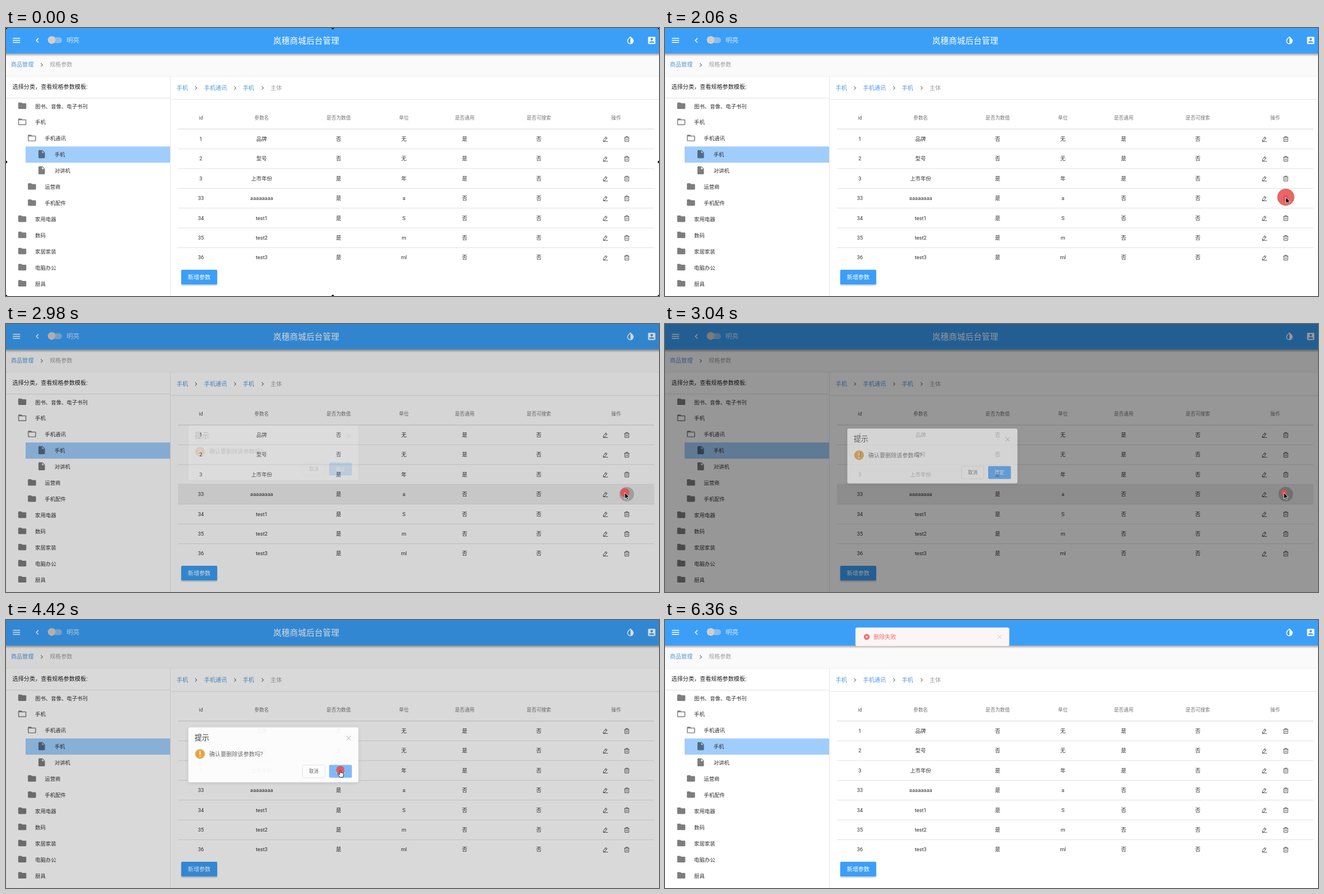
These frames come from a looping animation (1166x480 px, 7.98 s). An HTML page:

```html
<!DOCTYPE html>
<html lang="zh-CN">
<head>
<meta charset="utf-8">
<title>后台管理</title>
<style>
html, body { margin: 0; width: 100%; height: 100%; overflow: hidden; background: #fff; }
svg { display: block; width: 1166px; height: 480px; font-family: Roboto, "Noto Sans CJK SC", "Noto Sans CJK", sans-serif; }
</style>
</head>
<body>
<svg id="stage" viewBox="0 0 1166 480" xmlns="http://www.w3.org/2000/svg"></svg>
<script>
const LOOP = 7980;
const BLUE = '#3b9ff8', LINK = '#5497d9', INK = '#303030', MUTED = '#9e9e9e';

const ICONS = {
  menu: 'M3 18h18v-2H3v2zm0-5h18v-2H3v2zm0-7v2h18V6H3z',
  left: 'M15.41 7.41L14 6l-6 6 6 6 1.41-1.41L10.83 12z',
  right: 'M10 6L8.59 7.41 13.17 12l-4.58 4.59L10 18l6-6z',
  folder: 'M10 4H4c-1.1 0-2 .9-2 2v12c0 1.1.9 2 2 2h16c1.1 0 2-.9 2-2V8c0-1.1-.9-2-2-2h-8l-2-2z',
  open: 'M20 6h-8l-2-2H4c-1.1 0-2 .9-2 2v12c0 1.1.9 2 2 2h16c1.1 0 2-.9 2-2V8c0-1.1-.9-2-2-2zm0 12H4V8h16v10z',
  file: 'M6 2c-1.1 0-2 .9-2 2v16c0 1.1.9 2 2 2h12c1.1 0 2-.9 2-2V8l-6-6H6zm7 7V3.5L18.5 9H13z',
  invert: 'M17.66 7.93L12 2.27 6.34 7.93c-3.12 3.12-3.12 8.19 0 11.31C7.9 20.8 9.95 21.58 12 21.58s4.1-.78 5.66-2.34c3.12-3.12 3.12-8.19 0-11.31zM12 19.59c-1.6 0-3.11-.62-4.24-1.76C6.62 16.69 6 15.19 6 13.59s.62-3.11 1.76-4.24L12 5.1v14.49z',
  account: 'M3 5v14c0 1.1.89 2 2 2h14c1.1 0 2-.9 2-2V5c0-1.1-.9-2-2-2H5c-1.11 0-2 .9-2 2zm12 4c0 1.66-1.34 3-3 3s-3-1.34-3-3 1.34-3 3-3 3 1.34 3 3zm-9 8c0-2 4-3.1 6-3.1s6 1.1 6 3.1v1H6v-1z'
};

// Markup helpers; y is always the vertical centre.
const text = (s, x, y, size, fill = INK, anchor = 'start', extra = '') =>
  `<text x="${x}" y="${y + size * 0.365}" font-size="${size}" fill="${fill}" text-anchor="${anchor}" ${extra}>${s}</text>`;
const rect = (x, y, w, h, fill, extra = '') =>
  `<rect x="${x}" y="${y}" width="${w}" height="${h}" fill="${fill}" ${extra}/>`;
const icon = (name, x, y, fill, scale = 0.723) =>
  `<path d="${ICONS[name]}" fill="${fill}" transform="translate(${x} ${y}) scale(${scale}) translate(-12 -12)"/>`;
const cross = (x, y, r, color, width = 0.9) =>
  `<path d="M${x - r} ${y - r}l${2 * r} ${2 * r}m0 ${-2 * r}l${-2 * r} ${2 * r}" stroke="${color}" stroke-width="${width}" fill="none"/>`;
const rowY = i => 198.5 + 35.42 * i;

function header() {
  return rect(0, 45, 1166, 6, 'url(#shade)') + rect(0, 0, 1166, 45.5, BLUE) +
    icon('menu', 18.7, 22.2, '#fff') + icon('left', 56, 22.2, '#fff') +
    rect(76, 16.5, 24, 10.4, '#8bbdec', 'rx="5.2"') +
    '<circle cx="81.7" cy="22.2" r="7.3" fill="#000" opacity=".18"/><circle cx="81.6" cy="21.6" r="7.1" fill="#cfcfcf"/>' +
    text('明亮', 108, 21.5, 11.57, '#cfe6fc') +
    text('岚穗商城后台管理', 536.2, 22.5, 14.46, '#fff', 'middle', 'font-weight="500" letter-spacing=".29"') +
    icon('invert', 1115, 22, '#fff') + icon('account', 1153, 22.2, '#fff');
}

function crumbs(y, items) {
  return items.map(([label, x, chevron]) =>
    text(label, x, y, 10.12, chevron ? LINK : MUTED) +
    (chevron ? icon('right', chevron, y + 0.4, '#757575', 0.56) : '')).join('');
}

function tree() {
  const nodes = [
    [0, 'folder', '图书、音像、电子书刊'], [0, 'open', '手机'], [1, 'open', '手机通讯'],
    [2, 'file', '手机'], [2, 'file', '对讲机'], [1, 'folder', '运营商'], [1, 'folder', '手机配件'],
    [0, 'folder', '家用电器'], [0, 'folder', '数码'], [0, 'folder', '家居家装'],
    [0, 'folder', '电脑办公'], [0, 'folder', '厨具']
  ];
  return rect(35, 212.2, 258, 29, '#a0cdfb') + nodes.map(([depth, name, label], i) => {
    const y = 139.8 + 28.92 * i;
    return icon(name, 29 + 17.35 * depth, y - 0.6, i === 3 ? '#526a82' : '#7d7d7d') +
      text(label, 52 + 17.35 * depth, y + 0.3, 9.4);
  }).join('');
}

function pencil(x, y) {
  return `<path d="M${x - 3.6} ${y + 1.3}l4-5.2 2.5 1.9-4 5.2-2.9 .8zM${x - 0.8} ${y - 2.4}l2.5 1.9M${x - 4} ${y + 4.4}h8.3"/>`;
}
function bin(x, y) {
  return `<path d="M${x - 4.5} ${y - 2.7}h9M${x - 1.7} ${y - 2.8}v-1.6h3.4v1.6M${x - 3.5} ${y - 2.6}v7h7v-7M${x - 1.2} ${y - 0.6}v3M${x + 1.2} ${y - 0.6}v3"/>`;
}

function table() {
  const columns = [348, 456.5, 594, 710.5, 819, 951.5, 1089.5];
  const heads = ['id', '参数名', '是否为数值', '单位', '是否通用', '是否可搜索', '操作'];
  const rows = [
    ['1', '品牌', '否', '无', '是'], ['2', '型号', '否', '无', '是'], ['3', '上市年份', '是', '年', '是'],
    ['33', 'aaaaaaaa', '是', 'a', '否'], ['34', 'test1', '是', 'S', '否'],
    ['35', 'test2', '是', 'm', '否'], ['36', 'test3', '是', 'ml', '否']
  ];
  let out = heads.map((h, i) => text(h, columns[i], 160.5, 8.67, '#757575', 'middle', 'font-weight="500"')).join('');
  out += rect(307, 180.5, 850.5, 1, '#d2d2d2');
  rows.forEach((cells, r) => {
    const y = rowY(r);
    out += [...cells, '否'].map((c, i) => text(c, columns[i], y, 9.4, INK, 'middle')).join('');
    if (r < 6) out += rect(307, y + 17.4, 850.5, 0.9, '#dedede');
    out += `<g fill="none" stroke="#444" stroke-width=".9" stroke-linejoin="round">${pencil(1070.5, y + 0.4)}${bin(1108.5, y + 0.3)}</g>`;
  });
  return out;
}

function dialog() {
  return rect(325.6, 193.2, 303.6, 98.2, '#fff', 'rx="3" filter="url(#soft)"') +
    text('提示', 337, 211, 13, '#303133') + cross(612, 212.5, 3.8, '#909399') +
    '<circle cx="346.5" cy="240.8" r="8.7" fill="#e6a23c"/>' +
    '<path d="M346.5 236v5.6" stroke="#fff" stroke-width="1.8" stroke-linecap="round"/><circle cx="346.5" cy="245.2" r="1.1" fill="#fff"/>' +
    text('确认要删除该参数吗?', 363, 240.8, 10.12, '#606266') +
    rect(529.5, 260.7, 40, 22.4, '#fff', 'rx="2" stroke="#dcdfe6" stroke-width=".8"') +
    text('取消', 549.6, 272, 8.67, '#606266', 'middle', 'font-weight="500"') +
    rect(577, 260.3, 40.6, 23, '#409eff', 'rx="2" id="confirm"') +
    text('确定', 597.3, 272, 8.67, '#fff', 'middle', 'font-weight="500"');
}

function message() {
  return rect(340.3, 13.8, 274.2, 32.7, '#fbf5f5', 'rx="2.5" stroke="#fde2e2" stroke-width=".7"') +
    '<circle cx="360.2" cy="30.2" r="5.2" fill="#ef6b6b"/>' + cross(360.2, 30.2, 1.7, '#fff', 1.1) +
    text('删除失败', 372.3, 30.3, 10.12, '#ef7272') + cross(597.5, 30.2, 3.6, '#c4c6cb');
}

function handles() {
  return [0, 583.5, 1166].flatMap(x => [0, 240, 480].map(y => [x, y]))
    .filter(([x, y]) => x !== 583.5 || y !== 240)
    .map(([x, y]) => `<circle cx="${x}" cy="${y}" r="2.3" fill="#111"/>`).join('');
}

const stage = document.getElementById('stage');
stage.innerHTML = `<defs>
  <linearGradient id="shade" x2="0" y2="1"><stop stop-color="#000" stop-opacity=".38"/><stop offset="1" stop-color="#000" stop-opacity="0"/></linearGradient>
  <filter id="soft" x="-10%" y="-20%" width="120%" height="140%"><feDropShadow dx="0" dy="1.5" stdDeviation="3.5" flood-opacity=".12"/></filter>
  <filter id="lift" x="-10%" y="-20%" width="120%" height="160%"><feDropShadow dx="0" dy="1.5" stdDeviation="1.1" flood-opacity=".3"/></filter>
</defs>` +
  rect(0, 0, 1166, 480, '#fff') + rect(0, 45, 1166, 41.5, '#fafafa') + rect(0, 86, 1166, 0.8, '#ececec') + header() +
  crumbs(65.8, [['商品管理', 8.8, 63.8], ['规格参数', 78, 0]]) +
  text('选择分类，查看规格参数模板:', 11.6, 105.5, 10.12, '#222') +
  rect(0, 125, 293, 0.9, '#dedede') + rect(293, 87, 1, 393, '#e6e6e6') + tree() +
  crumbs(107, [['手机', 304.8, 339.2], ['手机通讯', 353.8, 409], ['手机', 423, 458.2], ['主体', 472.3, 0]]) +
  rect(295, 127.6, 871, 0.9, '#dedede') +
  rect(307, rowY(3) - 17.2, 850.5, 34.8, '#eee', 'id="hoverRow"') + table() +
  rect(313, 433, 64, 26.3, BLUE, 'rx="1.6" filter="url(#lift)"') +
  text('新增参数', 345, 446.3, 10.12, '#fff', 'middle', 'font-weight="500"') +
  '<circle id="halo" cx="1108.4" cy="304.8" r="13" fill="#bdbdbd"/>' +
  rect(0, 0, 1166, 480, '#000', 'id="overlay"') +
  `<g id="dialog">${dialog()}</g><g id="message">${message()}</g>
  <circle id="press" fill="#e64a4a" fill-opacity=".85"/>
  <g id="cursor">
    <path id="arrow" d="M0 0V11.2l2.6-2.4 1.7 3.9 1.8-.8-1.7-3.7H7.8z" fill="#000" stroke="#fff" stroke-width=".8"/>
    <path id="hand" d="M-1.2 .8c0-1.3 2-1.3 2 0v4c.4-.9 1.7-.7 1.8.2.6-.7 1.6-.4 1.7.5.7-.5 1.5 0 1.5.8v2.4c0 1.7-1 2.2-1 4H-.9c-.3-1.8-2.4-3.1-3.2-4.9-.5-1.2.9-1.8 1.7-.8l1.2 1.3z" fill="#fff" stroke="#111" stroke-width=".9" stroke-linejoin="round"/>
    <path id="beam" d="M-2.5 -6.3Q0 -6.3 0 -4.8V4.8Q0 6.3 -2.5 6.3M2.5 -6.3Q0 -6.3 0 -4.8V4.8Q0 6.3 2.5 6.3" fill="none" stroke="#222" stroke-width=".9"/>
  </g><g id="handles">${handles()}</g>`;

const parts = Object.fromEntries([...stage.querySelectorAll('[id]')].map(el => [el.id, el]));

const clamp = v => Math.max(0, Math.min(1, v));
const progress = (t, start, length) => clamp((t - start) / length);

// CSS "ease": cubic-bezier(.25, .1, .25, 1)
function ease(x) {
  let lo = 0, hi = 1;
  for (let i = 0; i < 18; i++) {
    const u = (lo + hi) / 2, v = 1 - u;
    if (0.75 * u * v * v + 0.75 * u * u * v + u ** 3 < x) lo = u; else hi = u;
  }
  const u = lo, v = 1 - u;
  return x >= 1 ? 1 : 0.3 * u * v * v + 3 * u * u * v + u ** 3;
}

const PATH = [
  [360, 686, 439], [520, 1047, 305], [820, 1047, 305], [960, 1067, 323], [1100, 1089, 335],
  [1300, 1097, 326], [1600, 1098, 306], [1780, 1108.5, 303], [2440, 1108.5, 303], [2700, 1105, 302],
  [3300, 1105, 302], [3480, 600, 274], [3740, 600, 274], [4100, 597, 269], [5160, 597, 269],
  [5200, 597, 270], [5920, 597, 270], [6360, 541, 482]
];
const PRESSES = [2000, 2760, 4190];

function pointer(t) {
  const i = PATH.findIndex(p => p[0] > t);
  if (i < 1) return null;
  const [a, b] = [PATH[i - 1], PATH[i]];
  const k = (t - a[0]) / (b[0] - a[0]);
  return [a[1] + (b[1] - a[1]) * k, a[2] + (b[2] - a[2]) * k];
}

const show = (el, on) => el.setAttribute('display', on ? 'inline' : 'none');
function fade(el, opacity) {
  show(el, opacity > 0.001);
  el.setAttribute('opacity', opacity);
}

function draw(t) {
  show(parts.handles, t < 60);

  const hover = progress(t, 2420, 220) * (1 - progress(t, 3300, 200));
  fade(parts.hoverRow, hover);
  fade(parts.halo, hover);

  fade(parts.overlay, 0.5 * (ease(progress(t, 2938, 200)) - ease(progress(t, 4338, 200))));
  const shown = ease(progress(t, 2938, 300)) - ease(progress(t, 4398, 300));
  fade(parts.dialog, shown);
  parts.dialog.setAttribute('transform', `translate(0 ${-14.5 * (1 - shown)})`);
  parts.confirm.setAttribute('fill', t >= 3460 ? '#79b8fb' : '#409eff');

  fade(parts.message, ease(progress(t, 4560, 300)));
  parts.message.setAttribute('transform', `translate(0 ${-32.7 * (1 - ease(progress(t, 4560, 400)))})`);

  const at = pointer(t);
  show(parts.cursor, at);
  const pressed = PRESSES.find(p => t >= p && t < p + 400);
  show(parts.press, at && pressed);
  if (!at) return;
  parts.cursor.setAttribute('transform', `translate(${at})`);
  const kind = t < 3440 ? 'arrow' : t < 4700 ? 'hand' : t < 5960 ? 'beam' : 'arrow';
  for (const name of ['arrow', 'hand', 'beam']) show(parts[name], name === kind);
  if (pressed) {
    parts.press.setAttribute('cx', at[0]);
    parts.press.setAttribute('cy', at[1]);
    parts.press.setAttribute('r', 18 * (1 - (t - pressed) / 400));
  }
}

const begin = performance.now();
function tick() {
  draw((performance.now() - begin) % LOOP);
  requestAnimationFrame(tick);
}
tick();
</script>
</body>
</html>
```
